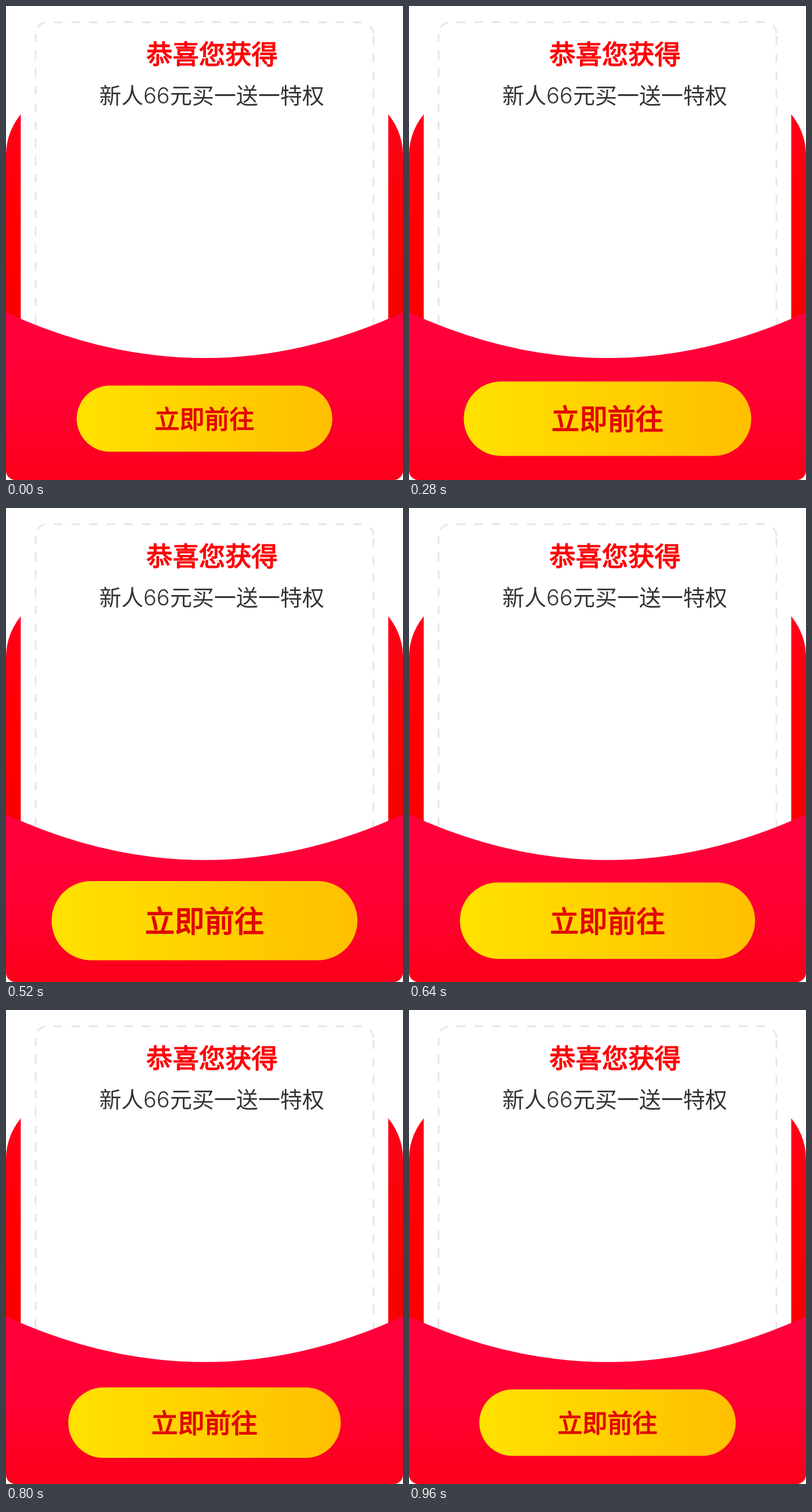
An HTML page that plays this animation: 685 px wide and 817 px high, repeating every 1000 ms.

```html
<!DOCTYPE html>
<html lang="zh-CN">
<head>
<meta charset="utf-8">
<title>恭喜您获得</title>
<style>
  html, body { margin: 0; width: 100%; height: 100%; overflow: hidden; background: #fff; }
  svg { display: block; width: 685px; height: 817px; }
  text { font-family: "Noto Sans CJK SC", "Noto Sans CJK", sans-serif; }
  .title, .label { text-anchor: middle; stroke-width: 1.5; stroke-linejoin: round; }
  .title { font-size: 45.4px; fill: #ff0008; stroke: #ff0008; }
  .label { font-size: 43px; fill: #e10602; stroke: #e10602; }
  .offer { font-size: 38px; fill: #333; }
  .digits { font-family: Inter, sans-serif; font-size: 38px; font-weight: 300; }
  .dash { fill: none; stroke: #e6e6e6; stroke-width: 3; stroke-dasharray: 15.2 15.2; }
</style>
</head>
<body>
<svg viewBox="0 0 685 817">
  <defs>
    <linearGradient id="back" gradientUnits="userSpaceOnUse" x1="0" y1="187" x2="0" y2="540">
      <stop offset="0" stop-color="#ff001a"/>
      <stop offset=".55" stop-color="#ff0000"/>
      <stop offset="1" stop-color="#f90000"/>
    </linearGradient>
    <linearGradient id="front" gradientUnits="userSpaceOnUse" x1="0" y1="528" x2="0" y2="817">
      <stop offset="0" stop-color="#ff003c"/>
      <stop offset=".5" stop-color="#ff0034"/>
      <stop offset="1" stop-color="#fb0019"/>
    </linearGradient>
    <linearGradient id="gold">
      <stop offset="0" stop-color="#ffe200"/>
      <stop offset="1" stop-color="#ffbf00"/>
    </linearGradient>
  </defs>

  <rect y="147" width="685" height="590" rx="110" fill="url(#back)"/>
  <rect x="25.5" width="634" height="640" fill="#fff"/>

  <path class="dash" d="M51 548V48"/>
  <path class="dash" d="M51 48A20 20 0 0 1 71 28H614A20 20 0 0 1 634 48" stroke-dashoffset="-12"/>
  <path class="dash" d="M634 52V560"/>

  <text class="title" x="355.5" y="99.7">恭喜您获得</text>
  <text class="offer" y="167.6"><tspan x="161">新人</tspan><tspan class="digits" x="237">66</tspan><tspan x="283">元买一送一特权</tspan></text>

  <path d="M0 528Q342.5 685.6 685 528V801A16 16 0 0 1 669 817H16A16 16 0 0 1 0 801Z" fill="url(#front)"/>

  <g id="button">
    <rect x="-220.5" y="-57" width="441" height="114" rx="57" fill="url(#gold)"/>
    <text class="label" y="16.8">立即前往</text>
  </g>
</svg>
<script>
  const LOOP = 1000, PEAK = 480, STEP = 40, GROW = 0.2;
  const button = document.getElementById('button');
  const start = performance.now();
  const smooth = p => p * p * (3 - 2 * p);

  function draw() {
    const now = (performance.now() - start + 1) % LOOP;
    const t = Math.floor(now / STEP) * STEP;
    const pulse = t < PEAK ? smooth(t / PEAK) : 1 - smooth((t - PEAK) / (LOOP - PEAK));
    button.setAttribute('transform', `translate(342.5 711.3) scale(${1 + GROW * pulse})`);
    requestAnimationFrame(draw);
  }
  draw();
</script>
</body>
</html>
```
